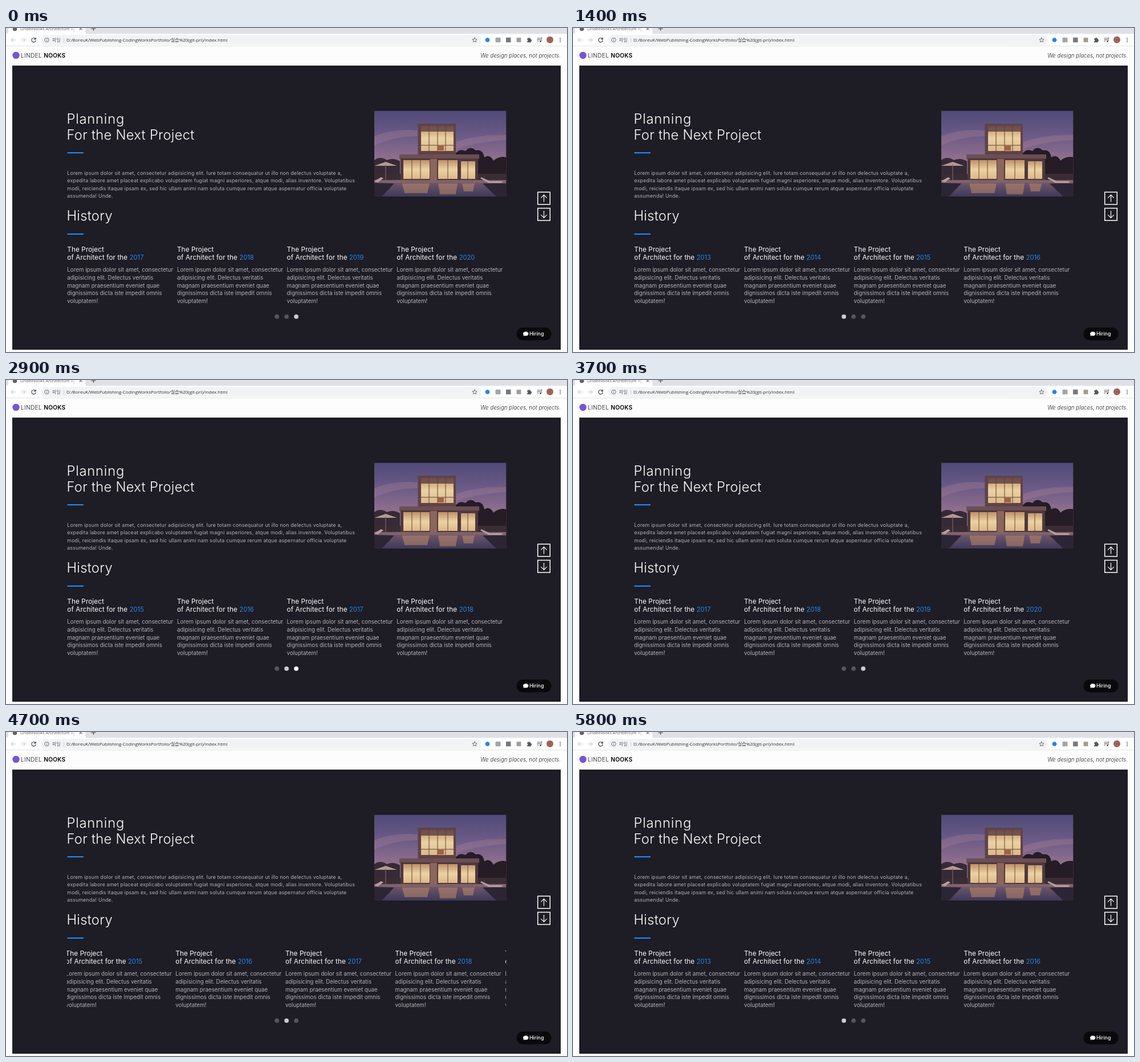
Animation, 984 px wide and 569 px high, one loop 7100 ms. Source, as an HTML page:

```html
<!DOCTYPE html>
<html lang="en">
<head>
<meta charset="utf-8">
<title>Architecture slider</title>
<style>
  html, body { margin: 0; width: 100%; height: 100%; overflow: hidden; background: #fdfdfd; }
  svg { display: block; width: 984px; height: 569px; }
  text { font-family: Inter, "Open Sans", sans-serif; white-space: pre; }
  .ui { font-family: "Open Sans", "Noto Sans CJK KR", "Noto Sans CJK", sans-serif; }
  .line { fill: none; stroke-linecap: round; stroke-linejoin: round; }
  .head { font-size: 23.8px; font-weight: 300; letter-spacing: .25px; fill: #fff; }
  .intro { font-size: 8.8px; letter-spacing: .17px; fill: #b4b3b7; }
  .name { font-size: 11.75px; letter-spacing: .08px; fill: #fff; }
  .year { font-size: 11.2px; fill: #1e87f0; }
  .body { font-size: 9.77px; fill: #b4b3b7; }
</style>
</head>
<body>
<svg viewBox="0 0 984 569" xmlns="http://www.w3.org/2000/svg">
  <defs>
    <linearGradient id="sky" x1="0" y1="0" x2="0" y2="1">
      <stop offset="0" stop-color="#504a78"/>
      <stop offset=".35" stop-color="#6b5a86"/>
      <stop offset=".65" stop-color="#8d6d8d"/>
      <stop offset=".85" stop-color="#a27b8b"/>
    </linearGradient>
    <linearGradient id="pool" x1="0" y1="0" x2="0" y2="1">
      <stop offset="0" stop-color="#6d5569"/>
      <stop offset="1" stop-color="#3d3a5a"/>
    </linearGradient>
    <linearGradient id="glow" x1="0" y1="0" x2="0" y2="1">
      <stop offset="0" stop-color="#bd9168"/>
      <stop offset=".5" stop-color="#ecd2a2"/>
      <stop offset="1" stop-color="#dcb988"/>
    </linearGradient>
    <linearGradient id="fade">
      <stop offset="0" stop-color="#fff" stop-opacity="0"/>
      <stop offset="1" stop-color="#fff"/>
    </linearGradient>
    <clipPath id="window"><rect x="107" y="380" width="770.3" height="110"/></clipPath>
    <clipPath id="photo"><rect x="646" y="145.5" width="231.3" height="150.5"/></clipPath>
  </defs>

  <!-- browser bar -->
  <rect width="984" height="11" fill="#dee1e6"/>
  <path d="M0 11Q4 10 4 6V0H139V6Q139 10 143 11Z" fill="#fff"/>
  <rect y="10.3" width="984" height="21" fill="#fff"/>
  <circle cx="15.5" cy="1.5" r="3.8" fill="#5f6368"/>
  <text class="ui" x="25" y="4" font-size="7.4" fill="#5f6368">LindelNooks Architecture Agen</text>
  <rect x="108" width="16" height="8" fill="url(#fade)"/>
  <rect x="124" width="5" height="8" fill="#fff"/>
  <g class="line" stroke="#45484c" stroke-width="1">
    <path d="M129.5 -.5l4 4m0-4l-4 4M150 1.3h7M153.5 -2v6.7"/>
    <path d="M16.5 21H9M12.5 17.5L9 21l3.5 3.5" stroke="#bdbfc2"/>
    <path d="M26.5 21h7.5M30.5 17.5L34 21l-3.5 3.5" stroke="#bdbfc2"/>
    <path d="M51.3 18.7A3.7 3.7 0 1 0 52.2 22M52.3 17v2.7h-2.8" stroke-width="1.2"/>
  </g>
  <rect x="61" y="12.3" width="772" height="17.4" rx="8.7" fill="#f1f3f4"/>
  <circle cx="71.5" cy="21" r="3.7" fill="none" stroke="#5f6368" stroke-width=".9"/>
  <path d="M71.5 20.5v2.5M71.5 18.7v.9" stroke="#5f6368" stroke-width=".9"/>
  <text class="ui" x="81" y="24" font-size="8" fill="#5f6368">파일</text>
  <path d="M101.5 17v8" stroke="#c4c7ca" stroke-width=".8"/>
  <text class="ui" x="106" y="24" font-size="7.97" fill="#303236">D:/BoreuK/WebPublishing-CodingWorksPortfolio/실습%20(git-pri)/index.html</text>
  <path class="line" d="M822 17l1.2 2.7 2.9.3-2.2 1.9.7 2.9-2.6-1.6-2.6 1.6.7-2.9-2.2-1.9 2.9-.3Z" stroke="#5f6368" stroke-width=".9"/>
  <circle cx="844.5" cy="21" r="3.8" fill="#1f88e0"/>
  <rect x="858.5" y="16.8" width="9" height="8.5" rx="1.5" fill="#a3a5a7"/>
  <rect x="877" y="16.8" width="8.5" height="8.5" rx="1" fill="#77797b"/>
  <rect x="895.5" y="17" width="8" height="8" rx="1" fill="#a59c98"/>
  <path d="M914 18.500h2a1.4 1.4 0 0 1 2.8 0h2v2a1.4 1.4 0 0 1 0 2.8v2h-6.800v-2a1.4 1.4 0 0 0 0-2.8Z" fill="#54585c"/>
  <path d="M931.5 18h5.5M931.5 20.5h5.5M931.5 23h3M938.5 23.5v-6h2" fill="none" stroke="#54585c" stroke-width="1.1"/>
  <circle cx="937.5" cy="23.5" r="1.4" fill="#54585c"/>
  <circle cx="954" cy="20.8" r="6" fill="#a2605a"/>
  <g fill="#54585c"><circle cx="972" cy="18" r=".9"/><circle cx="972" cy="21" r=".9"/><circle cx="972" cy="24" r=".9"/></g>
  <path d="M0 31.5h984" stroke="#e2e3e5"/>

  <!-- page header -->
  <circle cx="17.5" cy="48" r="6.2" fill="#7455d8"/>
  <text x="26" y="52" font-size="10.2" font-weight="300" letter-spacing=".3" fill="#111">LINDEL</text>
  <text x="66.3" y="52" font-size="10.2" font-weight="600" letter-spacing=".2" fill="#000">NOOKS</text>
  <text x="973" y="51.8" font-size="9.68" font-weight="300" font-style="italic" text-anchor="end" fill="#222">We design places, not projects.</text>

  <!-- section -->
  <rect x="11" y="66" width="962" height="499" fill="#1e1c24"/>
  <text class="head" x="106.5" y="168" style="letter-spacing:.75px">Planning</text>
  <text class="head" x="106.5" y="196">For the Next Project</text>
  <text class="head" x="106.5" y="338">History</text>
  <path d="M107.5 219.2h28.5M107.5 361.8h28.5" stroke="#1e87f0" stroke-width="2.3"/>
  <g id="intro"></g>

  <g clip-path="url(#photo)">
    <rect x="646" y="145" width="232" height="125" fill="url(#sky)"/>
    <path d="M646 190q36-14 76-10v10q-40 0-76 16ZM790 200q40-14 88-12v9q-50 2-88 15Z" fill="#a58096" opacity=".35"/>
    <path d="M646 232q10-8 22 0q12-5 23 2v37h-45Z" fill="#352a36"/>
    <path d="M786 224q8-14 20-8q8-10 18-1q12-3 15 12q10-6 16 6q10-9 23-6v45h-92Z" fill="#251c26"/>
    <rect x="646" y="256" width="232" height="16" fill="#3b2c34"/>
    <path d="M646 242l20-7 20 7Z" fill="#b39a92"/>
    <path d="M666 239v28" stroke="#8a7068"/>
    <rect x="722.5" y="168" width="66.500" height="55" fill="#5f4249"/>
    <rect x="728" y="172" width="57" height="44" fill="url(#glow)"/>
    <path d="M728 172h57v10h-57Z" fill="#553a3c" opacity=".75"/>
    <path d="M742 172v44M757 172v44M771 172v44M728 206h57" stroke="#5a403a"/>
    <path d="M757 215v-8h11v8Z" fill="#a2603f"/>
    <rect x="690" y="222" width="140" height="8" fill="#6c4e55"/>
    <rect x="692" y="229" width="136" height="40" fill="#4f383e"/>
    <path d="M697 232h46v33h-46ZM758 232h34v33h-34ZM798 234h25v31h-25Z" fill="url(#glow)"/>
    <path d="M712 232v33M727 232v33M775 232v33M810 234v31" stroke="#654638"/>
    <path d="M744 230h12v38h-12Z" fill="#8b655e"/>
    <rect x="646" y="267" width="232" height="5" fill="#80626a"/>
    <rect x="646" y="272" width="232" height="24" fill="url(#pool)"/>
    <path d="M695 273h48l-4 17h-40ZM758 273h34l-3 19h-28ZM800 273h22l-3 14h-16Z" fill="#c58f68" opacity=".5"/>
    <path d="M646 272l35 1-22 23h-13ZM836 273h42v23h-18Z" fill="#2c2535"/>
    <path d="M646 269l12-7 4 2-10 7ZM834 262l14 7h24l-3 3h-23l-14-8Z" fill="#b5a0a5"/>
  </g>

  <g fill="none" stroke="#fff" stroke-width="1.5">
    <path d="M932.7 288.2h21.6v21.6h-21.6ZM932.7 316.5h21.6v21.6h-21.6Z"/>
    <path d="M943.5 305.5v-12.5M938.3 298.3l5.2-5.3 5.2 5.3M943.5 321v12.5M938.3 328.2l5.2 5.3 5.2-5.3" stroke-width="1.2"/>
  </g>

  <g clip-path="url(#window)"><g id="track"></g></g>
  <g id="dots"></g>

  <rect x="895.5" y="526" width="61" height="22.5" rx="11.25" fill="#09080b"/>
  <path d="M911.7 533.2c2.7 0 4.7 1.6 4.7 3.7s-2 3.7-4.700 3.700q-1.2 0-2.200-.4q-1 .8-2.500.8q.8-.8 1-1.800q-1-1-1-2.300c0-2.100 2-3.700 4.700-3.700Z" fill="#fff"/>
  <text x="918" y="540" font-size="8.9" font-weight="500" fill="#fff">Hiring</text>
</svg>
<script>
const LOOP = 7100, STEP = 100, GLIDE = 300, LEFT = 107.3, PITCH = 192.65;

// start time, first visible card before and after
const moves = [[1074, 4, 0], [2519, 0, 2], [3400, 2, 4], [4425, 4, 2], [5440, 2, 0]];
// from, until, hovered dot
const hovers = [[600, 700, 1], [700, 1100, 0], [2100, 2600, 1],
  [2900, 3500, 2], [4200, 4500, 1], [5100, 5500, 0]];

const intro = [
  "Lorem ipsum dolor sit amet, consectetur adipisicing elit. Iure totam consequatur ut illo non delectus voluptate a,",
  "expedita labore amet placeat explicabo voluptatem fugiat magni asperiores, atque modi, alias inventore. Voluptatibus",
  "modi, reiciendis itaque ipsam ex, sed hic ullam animi nam soluta cumque rerum atque aspernatur officia voluptate",
  "assumenda! Unde."
];
const body = [
  "Lorem ipsum dolor sit amet, consectetur",
  "adipisicing elit. Delectus veritatis",
  "magnam praesentium eveniet quae",
  "dignissimos dicta iste impedit omnis",
  "voluptatem!"
];

const byId = id => document.getElementById(id);

function add(parent, tag, attrs, text = "") {
  const el = document.createElementNS("http://www.w3.org/2000/svg", tag);
  for (const key in attrs) el.setAttribute(key, attrs[key]);
  el.textContent = text;
  return parent.appendChild(el);
}

function write(parent, cls, x, y, text) {
  add(parent, "text", { class: cls, x, y }, text);
}

function writeLines(parent, cls, x, y, lines) {
  lines.forEach((line, i) => write(parent, cls, x, y + i * 13.6, line));
}

const track = byId("track");
writeLines(byId("intro"), "intro", LEFT, 257.6, intro);
for (let i = 0; i < 8; i++) {
  const x = LEFT + i * PITCH;
  write(track, "name", x, 393, "The Project");
  write(track, "name", x, 406.5, "of Architect for the");
  write(track, "year", x + 109.4, 406.5, 2013 + i);
  writeLines(track, "body", x, 428.3, body);
}
const dots = [0, 1, 2].map(i => add(byId("dots"), "circle", { cx: 475.1 + 17 * i, cy: 506.9, r: 3.9 }));

function draw(now) {
  const t = Math.floor(now % LOOP / STEP) * STEP;
  let place = 4, active = 2;
  for (const [start, from, to] of moves) {
    if (t <= start) break;
    const rest = 1 - Math.min(1, (t - start) / GLIDE);
    place = to + (from - to) * rest * rest;
    active = to / 2;
  }
  track.setAttribute("transform", `translate(${-place * PITCH} 0)`);

  const hover = hovers.find(([from, until]) => t >= from && t < until);
  dots.forEach((dot, i) => {
    const lit = hover && hover[2] === i;
    dot.setAttribute("fill", i === active ? "#cccbcd" : lit ? "#fff" : "#57555c");
  });
}

function tick() {
  draw(performance.now());
  requestAnimationFrame(tick);
}
tick();
</script>
</body>
</html>
```
